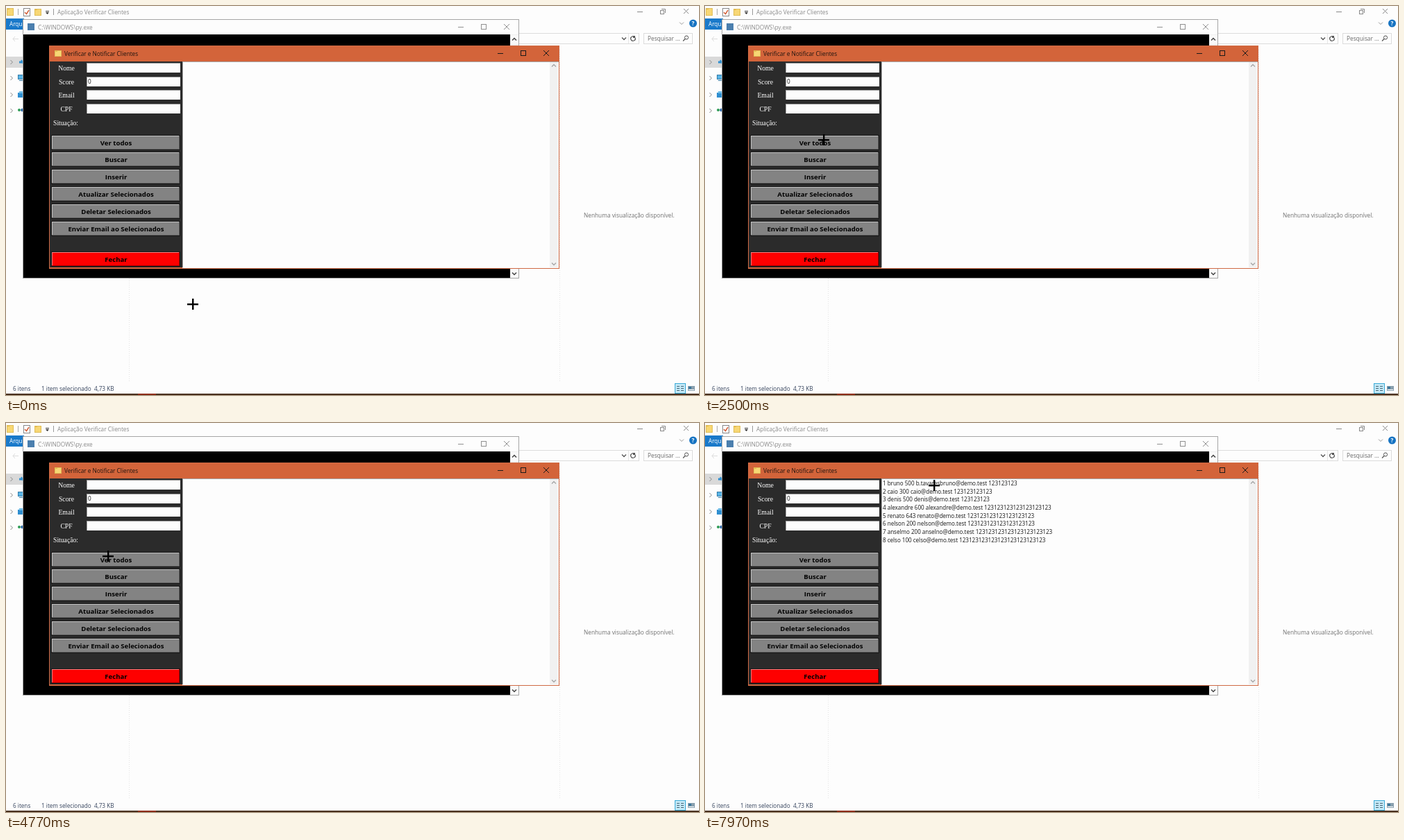
An HTML page with a canvas for the animation above (8000 ms loop, 998 by 561 pixels).

```html
<!DOCTYPE html>
<html lang="pt">
<head>
<meta charset="utf-8">
<title>Verificar e Notificar Clientes</title>
<style>
html, body { margin: 0; width: 100%; height: 100%; overflow: hidden; background: #fdfdfd; }
canvas { display: block; }
</style>
</head>
<body>
<canvas id="stage" width="998" height="561"></canvas>
<script>
const ctx = document.getElementById('stage').getContext('2d');
const LOOP = 8000, LIST_AT = 5670;
const PAPER = '#fdfdfd';
const SANS = '"Open Sans", "Noto Sans", sans-serif';
const SERIF = '"Liberation Serif", serif';

const clients = [
  ['bruno', 500, 'b.tavaresbruno', 3],
  ['caio', 300, 'caio', 4],
  ['denis', 500, 'denis', 3],
  ['alexandre', 600, 'alexandre', 7],
  ['renato', 643, 'renato', 7],
  ['nelson', 200, 'nelson', 7],
  ['anselmo', 200, 'anselno', 8],
  ['celso', 100, 'celso', 9]
].map(([name, score, user, n], i) =>
  `${i + 1} ${name} ${score} ${user}@demo.test ${'123'.repeat(n)}`);

// time, x, y
const path = [
  [0, 269, 430], [1230, 269, 430], [2030, 172, 194], [2170, 171, 193],
  [2500, 171, 193], [2720, 232, 222], [2960, 139, 205], [3160, 200, 175],
  [3330, 178, 186], [3580, 200, 198], [3830, 169, 190], [4130, 205, 204],
  [4350, 239, 209], [4770, 147, 192], [4860, 132, 196], [4980, 153, 196],
  [5130, 165, 198], [5670, 165, 198], [6070, 141, 205], [6300, 160, 217],
  [6500, 180, 221], [7300, 354, 122], [7500, 344, 77], [7800, 344, 77],
  [7970, 330, 90], [8000, 330, 90]
];

function rect(x, y, w, h, color) {
  ctx.fillStyle = color;
  ctx.fillRect(x, y, w, h);
}

function frame(x, y, w, h, color) {
  ctx.strokeStyle = color;
  ctx.lineWidth = 1;
  ctx.strokeRect(x + 0.5, y + 0.5, w - 1, h - 1);
}

function line(points, color, width = 1) {
  ctx.strokeStyle = color;
  ctx.lineWidth = width;
  ctx.beginPath();
  points.forEach(([x, y]) => ctx.lineTo(x, y));
  ctx.stroke();
}

function disc(x, y, r, color) {
  ctx.fillStyle = color;
  ctx.beginPath();
  ctx.arc(x, y, r, 0, Math.PI * 2);
  ctx.fill();
}

function text(str, x, y, color, size = 8.3, { font = SANS, weight = 400, align = 'left' } = {}) {
  ctx.font = `${weight} ${size}px ${font}`;
  ctx.textAlign = align;
  ctx.fillStyle = color;
  ctx.fillText(str, x, y);
}

// Arrow head pointing down (dir 1) or up (dir -1)
function chevron(x, y, dir, color, width = 1.3) {
  line([[x - 3, y - 1.5 * dir], [x, y + 1.5 * dir], [x + 3, y - 1.5 * dir]], color, width);
}

function controls(x, y, gap, color) {
  line([[x - 4, y + 0.5], [x + 4, y + 0.5]], color);
  frame(x + gap - 4, y - 4, 8, 8, color);
  const cx = x + 2 * gap;
  line([[cx - 4, y - 4], [cx + 4, y + 4]], color);
  line([[cx + 4, y - 4], [cx - 4, y + 4]], color);
}

function folder(x, y, w, h) {
  rect(x, y, w, h, '#f7d774');
  rect(x, y, w * 0.4, 2, '#e5b94a');
  frame(x, y, w, h, '#dfbd58');
}

function dottedLine(x, y1, y2) {
  ctx.setLineDash([1, 2]);
  line([[x + 0.5, y1], [x + 0.5, y2]], '#e4e4e4');
  ctx.setLineDash([]);
}

function drawExplorer() {
  rect(0, 0, 998, 561, PAPER);
  folder(1, 3, 10, 11);
  line([[17.5, 4], [17.5, 13]], '#aaa');
  rect(25, 3, 10, 12, '#fff');
  frame(25, 3, 10, 12, '#888');
  line([[27, 9], [29.5, 11.5], [33, 6]], '#d3603a', 1.5);
  folder(41, 4, 10, 10);
  line([[57, 7.5], [62, 7.5]], '#333');
  ctx.fillStyle = '#333';
  ctx.beginPath();
  ctx.moveTo(57, 9);
  ctx.lineTo(62, 9);
  ctx.lineTo(59.5, 12);
  ctx.fill();
  line([[68.5, 4], [68.5, 13]], '#999');
  text('Aplicação Verificar Clientes', 74, 12, '#8a8a8a');

  line([[909, 8.5], [917, 8.5]], '#888');
  frame(942, 6, 6, 6, '#888');
  line([[944, 4.5], [949.5, 4.5], [949.5, 10]], '#888');
  line([[976, 4], [983, 11]], '#888');
  line([[983, 4], [976, 11]], '#888');

  rect(0, 18, 26, 16, '#1979ca');
  text('Arqu', 5, 29, '#fff', 8.2);
  chevron(973, 25, 1, '#999', 1);
  disc(989.5, 25, 5.5, '#1673c2');
  text('?', 989.5, 28, '#fff', 8, { weight: 700, align: 'center' });

  line([[18, 47.5], [10, 47.5]], '#ddd');
  line([[13, 44], [10, 47.5], [13, 51]], '#ddd');
  frame(700, 39, 212, 16, '#dcdcdc');
  chevron(890, 47, 1, '#555');
  line([[896.5, 40], [896.5, 54]], '#e6e6e6');
  ctx.strokeStyle = '#555';
  ctx.lineWidth = 1.2;
  ctx.beginPath();
  ctx.arc(903, 47, 3.3, -0.4, 5);
  ctx.stroke();
  rect(903, 43, 3, 3, '#555');
  frame(918, 39, 71, 16, '#dcdcdc');
  text('Pesquisar ...', 924, 50, '#6a6a6a');
  ctx.strokeStyle = '#555';
  ctx.beginPath();
  ctx.arc(980, 45.5, 2.6, 0, 7);
  ctx.stroke();
  line([[978, 47.5], [975, 50.5]], '#555', 1.3);

  rect(0, 73, 26, 16, '#d9d9d9');
  for (const y of [81, 104, 128, 151])
    line([[6.5, y - 3], [9.5, y], [6.5, y + 3]], '#8a8a8a');
  line([[19, 81], [26, 81]], '#2e8fd0', 3);
  line([[22, 78], [26, 85]], '#2e8fd0', 2);
  rect(17, 99, 9, 7, '#58b4e6');
  frame(17, 99, 9, 7, '#367da8');
  rect(19, 107, 7, 1, '#367da8');
  rect(17, 125, 9, 7, '#2f8fd0');
  rect(19, 123, 7, 3, '#6abbe8');
  disc(19, 150, 2, '#2d9b55');
  disc(23.5, 150, 2.2, '#2464a8');

  dottedLine(177, 393, 541);
  dottedLine(797, 63, 541);
  text('Nenhuma visualização disponível.', 832, 304.5, '#707070');
  text('6 itens', 10, 555, '#34425c', 8.2);
  text('1 item selecionado', 51, 555, '#34425c', 8.2);
  text('4,73 KB', 127, 555, '#34425c', 8.2);

  rect(963, 544, 16, 15, '#c4e8f6');
  frame(963, 544, 16, 15, '#39a9d6');
  for (const y of [548, 551, 554]) {
    rect(966, y, 4, 1, '#467');
    rect(972, y, 4, 1, '#467');
  }
  rect(982, 548, 10, 7, '#8aa0ae');
  rect(983, 549, 4, 3, '#3b789c');
  rect(983, 553, 8, 1, '#fff');
  rect(0, 559, 998, 2, '#49301f');
  rect(190, 559, 26, 2, '#8c2c18');
}

function drawConsole() {
  rect(25, 20, 714, 373, '#000');
  rect(25, 20, 714, 21, PAPER);
  rect(726, 41, 13, 351, '#f0f0f0');
  rect(727, 42, 11, 13, '#fafafa');
  rect(727, 379, 11, 13, '#fafafa');
  chevron(732, 48, -1, '#444', 1.5);
  chevron(732, 386, 1, '#444', 1.5);
  frame(24, 19, 715, 374, '#a5a5a5');
  rect(31, 25, 10, 10, '#4b7fae');
  text('C:\\WINDOWS\\py.exe', 46, 33.5, '#8a8a8a');
  controls(655, 30, 33, '#909090');
}

function drawButton(label, y, color, light, dark) {
  rect(65, y - 1, 186, 22, '#171717');
  rect(66, y, 184, 20, color);
  rect(66, y, 184, 1, light);
  rect(66, y, 1, 20, light);
  rect(66, y + 19, 184, 1, dark);
  rect(249, y, 1, 20, dark);
  text(label, 158.5, y + 14, '#000', 9.6, { weight: 700, align: 'center' });
}

function drawApp(showList) {
  rect(62, 57, 735, 322, '#d3643a');
  folder(70, 64, 10, 9);
  text('Verificar e Notificar Clientes', 84, 72, '#1d1410', 8.25);
  controls(712, 68, 33, '#1a1a1a');

  rect(63, 80, 192, 297, '#2b2b2b');
  const serif = { font: SERIF, align: 'center' };
  ['Nome', 'Score', 'Email', 'CPF'].forEach((label, i) => {
    const y = Math.round(82 + i * 19.6);
    text(label, 87, y + 11, '#fff', 9.7, serif);
    rect(116, y, 135, 14, '#fdfdfd');
    rect(116, y, 135, 1, '#9a9a9a');
    rect(116, y, 1, 14, '#9a9a9a');
  });
  text('0', 118, 112, '#111', 8.2);
  text('Situação:', 68, 172, '#fff', 9.7, { font: SERIF });

  ['Ver todos', 'Buscar', 'Inserir', 'Atualizar Selecionados',
    'Deletar Selecionados', 'Enviar Email ao Selecionados'].forEach((label, i) =>
    drawButton(label, Math.round(186.5 + i * 24.8), '#838383', '#c4c4c4', '#5c5c5c'));
  drawButton('Fechar', 355, '#fe0000', '#ff8080', '#a80000');

  rect(254, 80, 542, 298, PAPER);
  rect(254, 80, 542, 1, '#a8a8a8');
  rect(254, 80, 1, 297, '#a8a8a8');
  rect(783, 81, 12, 296, '#f1f1f1');
  chevron(789, 86, -1, '#a6a6a6');
  chevron(789, 372, 1, '#a6a6a6');
  frame(62, 57, 735, 322, '#cf6a45');

  if (showList)
    clients.forEach((row, i) => text(row, 256, 90 + i * 11.67, '#151515', 8.05));
}

function pointerAt(t) {
  let i = 1;
  while (i < path.length - 1 && path[i][0] <= t) i++;
  const [t0, x0, y0] = path[i - 1], [t1, x1, y1] = path[i];
  const p = (t - t0) / (t1 - t0), e = p * p * (3 - 2 * p);
  return [x0 + (x1 - x0) * e, y0 + (y1 - y0) * e];
}

function drawPointer(t) {
  const [x, y] = pointerAt(t).map(Math.round);
  rect(x - 8, y - 1, 16, 2.4, '#000');
  rect(x - 1, y - 8, 2.4, 16, '#000');
}

const start = performance.now();

function draw() {
  const t = (performance.now() - start) % LOOP;
  drawExplorer();
  drawConsole();
  drawApp(t >= LIST_AT);
  drawPointer(t);
  requestAnimationFrame(draw);
}
draw();
</script>
</body>
</html>
```
